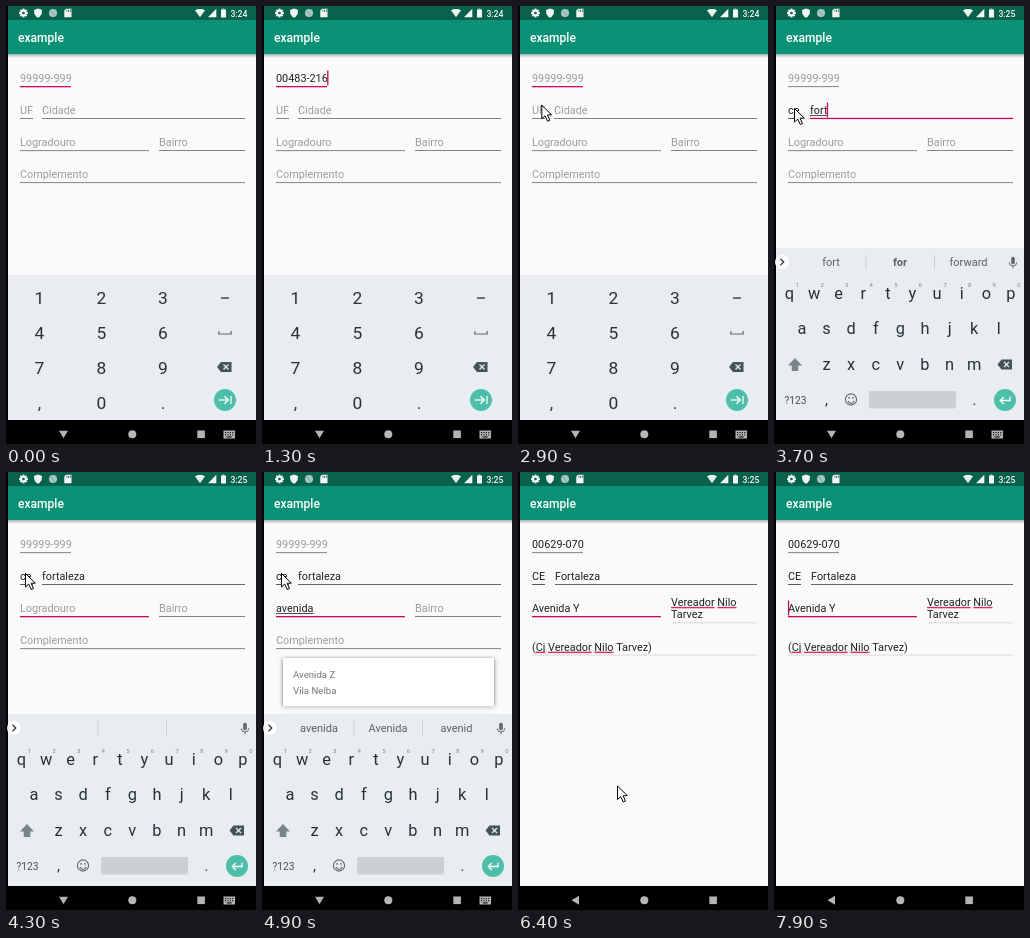
Write an HTML page with a canvas that moves like this. It is 250x438 px and loops after 8000 ms.

```html
<!DOCTYPE html>
<html lang="pt">
<head>
<meta charset="utf-8">
<title>Address form</title>
<style>
html, body { margin: 0; width: 100%; height: 100%; overflow: hidden; background: #000; }
canvas { display: block; width: 100vw; height: 100vh; }
</style>
</head>
<body>
<canvas id="stage"></canvas>
<script>
const W = 250, H = 438, LOOP = 8000, STEP = 100;
const ACCENT = '#c8085c', INK = '#212121', HINT = '#9c9c9c', KEY = '#263238';
const TEAL = '#4dbfa9', PANEL = '#e9edf1', DARK = '#777', LIGHT = '#d6d6d6';
const BODY = 10.85;

const canvas = document.getElementById('stage');
const ctx = canvas.getContext('2d');
const dpr = window.devicePixelRatio || 1;
canvas.width = W * dpr;
canvas.height = H * dpr;

const clamp = v => Math.max(0, Math.min(1, v));
const ease = v => { v = clamp(v); return v * v * (3 - 2 * v); };
const typed = (s, t, start, step) => s.slice(0, Math.max(0, Math.floor((t - start) / step) + 1));
const caretOn = t => ((t - 7200) % 350 + 350) % 350 < 140;

function rect(x, y, w, h, color) {
  ctx.fillStyle = color;
  ctx.fillRect(x, y, w, h);
}
function disc(x, y, r, color) {
  ctx.fillStyle = color;
  ctx.beginPath();
  ctx.arc(x, y, r, 0, Math.PI * 2);
  ctx.fill();
}
function poly(points, color) {
  ctx.fillStyle = color;
  ctx.beginPath();
  points.forEach(([x, y]) => ctx.lineTo(x, y));
  ctx.closePath();
  ctx.fill();
}
function lines(points, color, width) {
  ctx.strokeStyle = color;
  ctx.lineWidth = width;
  ctx.beginPath();
  points.forEach(([x, y]) => ctx.lineTo(x, y));
  ctx.stroke();
}
function text(s, x, y, size, color, align = 'left', weight = 400) {
  ctx.font = `${weight} ${size}px Roboto, sans-serif`;
  ctx.textAlign = align;
  ctx.fillStyle = color;
  ctx.fillText(s, x, y);
}
const widthOf = s => {
  ctx.font = `400 ${BODY}px Roboto, sans-serif`;
  return ctx.measureText(s).width;
};
function at(x, y, draw) {
  ctx.save();
  ctx.translate(x, y);
  draw();
  ctx.restore();
}

// Body text with spell-check marks under the given words.
function spelled(s, x, y, words = []) {
  text(s, x, y, BODY, INK);
  words.forEach(w => {
    const left = x + widthOf(s.slice(0, s.indexOf(w)));
    rect(left, y + 1.2, widthOf(w), 1.4, '#d2305f');
  });
}
function underline(x1, x2, y, focused, color = DARK) {
  rect(x1, focused ? y - 0.6 : y - 0.4, x2 - x1, focused ? 1.3 : 0.9, focused ? ACCENT : color);
}
function caret(x, base) {
  rect(x - 0.6, base - 11.5, 1.3, 15, ACCENT);
}
function field(s, hint, x, base) {
  text(s || hint, x, base, BODY, s ? INK : HINT);
}

const firstPlace = {
  cep: '00483-216', street: ['Avenida Vereador Fabrino', 'Nunes de Tavra'], district: 'Tarubema'
};
const pick = {
  cep: '00629-070', street: 'Avenida Y', district: ['Vereador Nilo', 'Tarvez'],
  extra: '(Cj Vereador Nilo Tarvez)'
};
const results = [
  ['Z', 'Vila Nelba'], ['Y', 'Lorenita'], ['P', 'Conjunto Talmo I'], ['X', 'Vila Nelba'],
  ['W', 'Lorenita'], ['K', 'Conjunto Talmo I'], ['R', 'Vila Nelba'], ['Y', 'Vereador Nilo Tarvez'],
  ['M', 'Lorenita'], ['S', 'Vila Nelba'], ['Q', 'Lorenita']
];

function statusBar(t) {
  rect(2, 0, 248, 14, '#07614b');
  const c = '#f2f7f5';
  at(17.5, 7, () => {
    for (let i = 0; i < 8; i++) {
      ctx.rotate(Math.PI / 4);
      rect(-1, -4.4, 2, 2.5, c);
    }
    disc(0, 0, 3.3, c);
    disc(0, 0, 1.3, '#07614b');
  });
  poly([[32, 2.5], [36, 4], [35.6, 8], [34, 10.3], [32, 11.7], [30, 10.3], [28.4, 8], [28, 4]], c);
  disc(47, 7, 4, '#a9c8bf');
  lines([[44.6, 5], [49, 9.6]], '#6f9f91', 1);
  poly([[60, 2.8], [65.5, 2.8], [65.5, 11.3], [58.3, 11.3], [58.3, 4.6]], c);
  [60.6, 62.3, 64].forEach(x => rect(x, 3.8, 0.8, 2, '#07614b'));
  poly([[189, 4.3], [192, 2.9], [196, 2.9], [199, 4.3], [194, 11.3]], c);
  poly([[210.3, 2.8], [210.3, 11.3], [202, 11.3]], c);
  rect(215, 3.5, 5, 8, c);
  rect(216.5, 2.6, 2, 1, c);
  text(t < 3000 ? '3:24' : '3:25', 241.5, 10.6, 8.7, c, 'right', 500);
}

function appBar() {
  const g = ctx.createLinearGradient(0, 48, 0, 52);
  g.addColorStop(0, 'rgba(0,0,0,.3)');
  g.addColorStop(1, 'rgba(0,0,0,0)');
  rect(2, 48, 248, 4, g);
  rect(2, 14, 248, 34, '#0b9276');
  text('example', 12, 36, 12.06, '#fff', 'left', 500);
}

function form(t) {
  const found = t >= 1600 && t < 2600;
  const picked = t >= 6300;
  const focus = t < 3000 ? 'cep' : t < 3400 ? 'uf' : t < 4300 ? 'city' : 'street';
  const tall = found || picked;

  let cep = '';
  if (picked) cep = pick.cep;
  else if (t < 2600) cep = typed(firstPlace.cep, t, 300, 110);
  const uf = tall ? 'CE' : typed('ce', t, 3200, 100);
  const city = tall ? 'Fortaleza' : typed('fortaleza', t, 3400, 100);
  const street = picked ? pick.street : typed('avenida', t, 4400, 75);
  const selecting = t >= 2300 && t < 2600;

  if (selecting) rect(14, 65, 51.5, 14.5, '#e79fbf');
  field(cep, '99999-999', 14, 76);
  underline(14, 65, 80.6, focus === 'cep');
  if (selecting) {
    poly([[53, 79.5], [57, 83.5], [49, 83.5]], ACCENT);
    disc(53, 87, 5.6, ACCENT);
  }

  field(uf, 'UF', 14, 108);
  underline(14, 27, 112.4, focus === 'uf', uf ? '#444' : DARK);
  field(city, 'Cidade', tall ? 37 : 36, 108);
  underline(tall ? 37 : 36, 239, 112.4, focus === 'city', city ? '#555' : DARK);

  if (found) {
    const [a, b] = firstPlace.street;
    spelled(a, 14, 140, ['Vereador', 'Fabrino']);
    spelled(b, 14, 153, ['Nunes', 'Tavra']);
    underline(14, 143, 157.4, false, LIGHT);
    spelled(firstPlace.district, 153, 146.5, [firstPlace.district]);
    underline(153, 239, 150.6, false);
  } else {
    field(street, 'Logradouro', 14, 140);
    underline(14, 143, 144.6, focus === 'street');
    if (picked) {
      spelled(pick.district[0], 153, 133.7, ['Vereador', 'Nilo']);
      spelled(pick.district[1], 153, 146.3);
      underline(153, 239, 150.8, false, LIGHT);
    } else {
      field('', 'Bairro', 153, 140);
      underline(153, 239, 144.4, false);
    }
  }

  if (picked) spelled(pick.extra, 14, 178.5, ['Cj', 'Vereador', 'Nilo']);
  else field('', 'Complemento', 14, tall ? 178.5 : 172);
  underline(14, 239, tall ? 183 : 176.6, false, tall ? LIGHT : DARK);

  // Underline of the word being composed.
  if (focus === 'city') rect(36, 109.2, widthOf(city), 0.8, INK);
  if (focus === 'street' && t < 5300) rect(14, 141.2, widthOf(street), 0.8, INK);

  if (!caretOn(t) || selecting) return;
  if (focus === 'cep') caret(14 + widthOf(cep), 76);
  if (focus === 'uf') caret(14 + widthOf(uf), 108);
  if (focus === 'city') caret(36 + widthOf(city), 108);
  if (focus === 'street') caret(14 + (picked ? 0.5 : widthOf(street) + 0.5), 140);
}

function shadow(blur, alpha, dy) {
  ctx.shadowColor = `rgba(0,0,0,${alpha})`;
  ctx.shadowBlur = blur * dpr;
  ctx.shadowOffsetY = dy * dpr;
}

function resultList(t) {
  if (t < 4900 || t >= 6300) return;
  const bottom = t < 5400 ? 234 : 404;
  const scroll = 240 * ease((t - 5700) / 400);
  ctx.save();
  shadow(5, 0.25, 1);
  rect(21, 186, 211, bottom - 186, '#fafafa');
  ctx.beginPath();
  ctx.rect(16, 184, 221, bottom - 184);
  ctx.clip();
  results.forEach(([letter, place], i) => {
    const y = 186 + i * 49.3 - scroll;
    shadow(3, 0.4, 1);
    rect(21, y, 211, 48, '#fff');
    shadow(0, 0, 0);
    text('Avenida ' + letter, 31, y + 20.3, 9.65, '#757575');
    text(place, 31, y + 36.3, 9.65, '#757575');
  });
  ctx.restore();
}

function backspace(x, y) {
  at(x, y, () => {
    poly([[-7.5, 0], [-3.5, -5], [7, -5], [7, 5], [-3.5, 5]], '#46525a');
    lines([[-1, -2.5], [4, 2.5]], PANEL, 1.2);
    lines([[4, -2.5], [-1, 2.5]], PANEL, 1.2);
  });
}

function numericPad() {
  rect(2, 270, 248, 144, PANEL);
  rect(2, 269.4, 248, 0.8, '#dfe3e6');
  const cols = [33.5, 95.5, 157];
  ['123', '456', '789', ',0.'].forEach((row, r) =>
    [...row].forEach((ch, c) => text(ch, cols[c], 298.3 + r * 35, 17.4, KEY, 'center')));
  rect(215, 291.4, 8, 1.3, KEY);
  lines([[212.8, 325], [212.8, 328], [225.2, 328], [225.2, 325]], '#5f6a70', 1.2);
  backspace(218.5, 361);
  disc(219, 394, 11, TEAL);
  lines([[212.5, 394], [222, 394]], '#fff', 1.3);
  lines([[218.5, 390.3], [222.2, 394], [218.5, 397.7]], '#fff', 1.3);
  lines([[225, 390], [225, 398]], '#fff', 1.3);
}

function suggestions(t) {
  if (t < 3200) return [];
  const word = t < 3400 ? typed('ce', t, 3200, 100)
    : t < 4300 ? typed('fortaleza', t, 3400, 100) : typed('avenida', t, 4400, 75);
  if (!word) return [];
  if (word === 'fort') return [word, 'for', 'forward'];
  return [word, word[0].toUpperCase() + word.slice(1), word.slice(0, -1)];
}

function qwerty(t) {
  rect(2, 243, 248, 171, PANEL);
  rect(2, 242.4, 248, 0.8, '#dfe3e6');
  disc(8, 256, 7, '#fff');
  lines([[6.5, 252.8], [9.7, 256], [6.5, 259.2]], '#333', 1.3);
  suggestions(t).forEach((s, i) =>
    text(s, [57, 126, 194.5][i], 260, 11, '#59636a', 'center', s === 'for' ? 700 : 400));
  [91.5, 160].forEach(x => rect(x, 249, 0.8, 14, '#c3c8cc'));

  ctx.lineCap = 'round';
  lines([[239, 252.5], [239, 256.5]], '#5f6a70', 3.6);
  ctx.lineCap = 'butt';
  ctx.beginPath();
  ctx.arc(239, 256.3, 3.7, 0, Math.PI);
  ctx.lineWidth = 1;
  ctx.stroke();
  rect(238.5, 260, 1, 2.2, '#5f6a70');

  const row = (keys, x0, base) => [...keys].forEach((k, i) =>
    text(k, x0 + i * 24.6, base, 16.4, KEY, 'center'));
  row('qwertyuiop', 15.5, 292.6);
  [...'1234567890'].forEach((d, i) => text(d, 23.5 + i * 24.6, 280.5, 6, '#7b868c', 'center'));
  row('asdfghjkl', 28, 328);
  row('zxcvbnm', 52.5, 363.6);

  poly([[21, 352], [28, 359.5], [24.3, 359.5], [24.3, 365], [17.7, 365], [17.7, 359.5], [14, 359.5]], '#78838a');
  backspace(231, 358.5);
  text('?123', 21.5, 397.6, 10.2, '#46525a', 'center');
  text(',', 52.5, 398.5, 15, KEY, 'center');
  text('.', 200.5, 398.5, 15, KEY, 'center');
  ctx.strokeStyle = '#5f6a70';
  ctx.lineWidth = 1.1;
  ctx.beginPath();
  ctx.arc(77, 393.5, 5.6, 0, Math.PI * 2);
  ctx.stroke();
  ctx.beginPath();
  ctx.arc(77, 394.3, 3, 0.2, Math.PI - 0.2);
  ctx.stroke();
  disc(75, 391.8, 0.9, '#5f6a70');
  disc(79, 391.8, 0.9, '#5f6a70');
  ctx.fillStyle = '#cbd0d4';
  ctx.beginPath();
  ctx.roundRect(95, 385, 87, 17.5, 2);
  ctx.fill();
  disc(231, 394, 11, TEAL);
  lines([[236, 390.5], [236, 394.5], [226.5, 394.5]], '#fff', 1.3);
  lines([[229.8, 391], [226.3, 394.5], [229.8, 398]], '#fff', 1.3);
}

function keyboard(t) {
  if (t < 3100) numericPad();
  else if (t < 5500) at(0, 171 * ease((t - 5250) / 220), () => qwerty(t));
}

function navBar(t) {
  const open = t < 5400;
  const c = !open && t < 6300 ? '#f4f4f4' : '#b4b4b4';
  rect(0, 414, 250, 24, '#000');
  if (open) poly([[53, 424.8], [62, 424.8], [57.5, 432.3]], c);
  else poly([[61, 423.8], [61, 432.8], [53.5, 428.3]], c);
  disc(126.3, 428.3, 4, c);
  rect(191.3, 424.5, 7.6, 7.6, c);
  if (!open) return;
  rect(217.5, 424.5, 11.5, 8, c);
  for (let i = 0; i < 4; i++) {
    rect(219 + i * 2.4, 426, 1.1, 1.1, '#000');
    rect(219 + i * 2.4, 428.2, 1.1, 1.1, '#000');
  }
  rect(220.7, 430.4, 5, 1, '#000');
}

const mousePath = [
  [2000, 92, 130], [2200, 52.5, 71], [2700, 52.5, 71], [2950, 20.5, 102.5], [3900, 20.5, 102.5],
  [4300, 19.5, 101.5], [4950, 19.5, 101.5], [5250, 56, 424], [5450, 60, 446], [5530, 130, 446],
  [5700, 99.5, 314], [6600, 99.5, 314], [7100, 150, 442]
];
function mouse(t) {
  const i = mousePath.findIndex(p => p[0] > t);
  if (i < 1) return;
  const [t0, x0, y0] = mousePath[i - 1], [t1, x1, y1] = mousePath[i];
  const k = ease((t - t0) / (t1 - t0));
  at(x0 + (x1 - x0) * k, y0 + (y1 - y0) * k, () => {
    const arrow = [[0, 0], [0, 13.5], [3.2, 10.6], [5.7, 16], [8, 15], [5.6, 9.8], [9.8, 9.6], [0, 0], [0, 1]];
    poly(arrow, '#fff');
    lines(arrow, '#000', 1);
  });
}

function draw(t) {
  ctx.setTransform(dpr, 0, 0, dpr, 0, 0);
  rect(0, 0, W, H, '#000');
  rect(2, 14, 248, 400, '#fafafa');
  form(t);
  resultList(t);
  appBar();
  statusBar(t);
  keyboard(t);
  navBar(t);
  mouse(t);
}

function tick() {
  const t = performance.now() % LOOP;
  draw(Math.floor(t / STEP) * STEP);
  requestAnimationFrame(tick);
}
tick();
</script>
</body>
</html>
```
